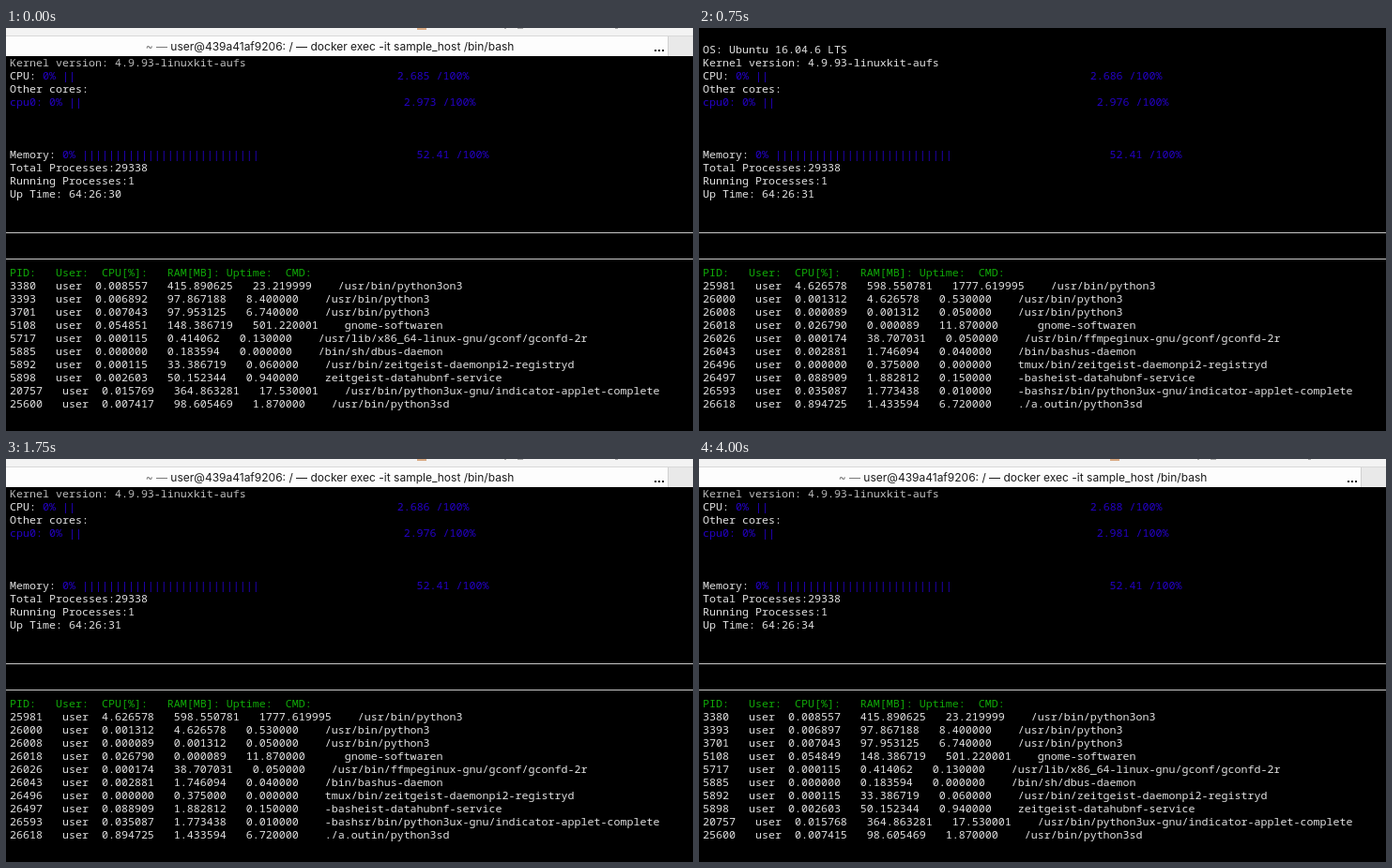
Animation, 732 px wide and 430 px high, one loop 4500 ms. Source, as an HTML page:

```html
<!DOCTYPE html>
<html lang="en">
<head>
<meta charset="utf-8">
<title>Process monitor</title>
<style>
html, body { margin: 0; width: 100%; height: 100%; overflow: hidden; background: #000; }
#stage { position: relative; width: 732px; height: 430px; overflow: hidden; background: #000; }
pre {
  position: absolute; left: 4px; top: 16px; margin: 0; color: #e2e2e2;
  font: 500 11.667px/14px "Noto Sans Mono", monospace; font-variant-ligatures: none;
}
.b { color: #2300c4; }
.g { color: #10aa08; }
hr { position: absolute; left: 0; width: 732px; height: 1px; margin: 0; border: 0; background: #c8c8c8; }
svg { position: absolute; left: 0; top: 0; }
</style>
</head>
<body>
<div id="stage">
  <pre id="screen"></pre>
  <hr style="top:218px">
  <hr style="top:246px">
  <svg width="732" height="48">
    <defs>
      <linearGradient id="shade" x2="0" y2="1">
        <stop stop-opacity=".4"/>
        <stop offset="1" stop-opacity="0"/>
      </linearGradient>
    </defs>
    <g id="bar">
      <rect y="30" width="732" height="13" fill="url(#shade)"/>
      <rect width="732" height="30" fill="#f3f3f3"/>
      <path d="M438 0h10v2h-10z" fill="#d9ab85"/>
      <path d="M531 0h2v1h-2zM545 0h6v1h-6zM649 0h3v1h-3z" fill="#aaa"/>
      <path d="M0 8.5H732" stroke="#d8d8d8"/>
      <rect id="tab" y="9" width="705" height="21"/>
      <rect x="705" y="9" width="27" height="21" fill="#e9e9e9"/>
      <path d="M705.5 9V30" stroke="#d0d0d0"/>
      <text x="345" y="23.5" text-anchor="middle" font-family="Inter, sans-serif" font-size="12" fill="#1a1a1a"><tspan fill="#777">~ — </tspan>user@439a41af9206: / — docker exec -it sample_host /bin/bash</text>
      <path id="dots" d="M691 23h2v2h-2zM695 23h2v2h-2zM699 23h2v2h-2z" fill="#111"/>
      <path id="close" d="M713.5 14.5l7 7m0-7l-7 7" stroke="#777" stroke-width="1.1"/>
    </g>
  </svg>
</div>
<script>
const LOOP = 4500;
const $ = id => document.getElementById(id);

// Each row: pid, cpu, ram, uptime, command (with characters left over from earlier screens)
const first = `3380 0.008557 415.890625 23.219999 /usr/bin/python3on3
3393 0.006892 97.867188 8.400000 /usr/bin/python3
3701 0.007043 97.953125 6.740000 /usr/bin/python3
5108 0.054851 148.386719 501.220001 gnome-softwaren
5717 0.000115 0.414062 0.130000 /usr/lib/x86_64-linux-gnu/gconf/gconfd-2r
5885 0.000000 0.183594 0.000000 /bin/sh/dbus-daemon
5892 0.000115 33.386719 0.060000 /usr/bin/zeitgeist-daemonpi2-registryd
5898 0.002603 50.152344 0.940000 zeitgeist-datahubnf-service
20757 0.015769 364.863281 17.530001 /usr/bin/python3ux-gnu/indicator-applet-complete
25600 0.007417 98.605469 1.870000 /usr/bin/python3sd`;

const second = `25981 4.626578 598.550781 1777.619995 /usr/bin/python3
26000 0.001312 4.626578 0.530000 /usr/bin/python3
26008 0.000089 0.001312 0.050000 /usr/bin/python3
26018 0.026790 0.000089 11.870000   gnome-softwaren
26026 0.000174 38.707031 0.050000 /usr/bin/ffmpeginux-gnu/gconf/gconfd-2r
26043 0.002881 1.746094 0.040000 /bin/bashus-daemon
26496 0.000000 0.375000 0.020000 tmux/bin/zeitgeist-daemonpi2-registryd
26497 0.088909 1.882812 0.150000 -basheist-datahubnf-service
26593 0.035087 1.773438 0.010000 -bashsr/bin/python3ux-gnu/indicator-applet-complete
26618 0.894725 1.433594 6.720000 ./a.outin/python3sd`.replace("0.020000", "0.000000");

const third = `1 0.000013 0.199219 0.030000 /bin/bash/usr/bin/python3
39 0.009543 13.125000 20.240000 tmuxr/bin/python3
40 0.101008 1.863281 0.140000 -bashsr/bin/python3
65 2.408436 3.671875 1.420000 -bash gnome-softwaren
89 0.000101 1.773438 0.030000 -bashusr/bin/ffmpeginux-gnu/gconf/gconfd-2r
113 0.001283 2.726562 0.260000 -bashn/bashus-daemon
645 10.743024 153.730469 3318.820068 /usr/bin/python3aemonpi2-registryd
735 0.008034 327.531250 17.830000 /usr/bin/python3nf-service
918 0.067322 26.968750 208.880005 Xvnc4r/bin/python3ux-gnu/indicator-applet-complete
927 0.167101 105.132812 16.480000 gnome-panelthon3sd`;

const fourth = `929 0.001785 30.910156 6.210000 metacitysr/bin/python3
930 0.019672 98.179688 400.980011 nautiluspython3
950 0.000000 0.371094 0.000000 dbus-launchpython3
954 0.000394 0.597656 0.740000 /usr/bin/dbus-daemon
959 0.000005 32.972656 0.030000 /usr/lib/at-spi2-core/at-spi-bus-launcher
964 0.000016 0.398438 0.000000 /usr/bin/dbus-daemon
968 0.000016 16.792969 0.100000 /usr/lib/at-spi2-core/at-spi2-registryd
991 0.000048 16.800781 0.040000 /usr/lib/dconf/dconf-service
1000 0.000027 27.535156 0.130000 /usr/lib/x86_64-linux-gnu/indicator-applet-complete
1009 0.000005 24.894531 0.010000 /usr/lib/gvfs/gvfsd`;

const fifth = first.replace("0.006892", "0.006897").replace("0.054851", "0.054849")
  .replace("0.015769", "0.015768").replace("0.007417", "0.007415");

const screens = [
  { at: 0, cpu: "2.685", core: "2.973", rows: first },
  { at: 750, cpu: "2.686", core: "2.976", rows: second },
  { at: 2000, cpu: "2.690", core: "2.978", rows: third },
  { at: 3000, cpu: "2.690", core: "2.978", rows: fourth },
  { at: 4000, cpu: "2.688", core: "2.981", rows: fifth }
];

// Title bar: vertical shift (null = hidden), close button, opacity of the dots
const bars = [
  { at: 0, y: 0, close: 0, dots: 1 },
  { at: 250, y: 0, close: 1, dots: 1 },
  { at: 500, y: null },
  { at: 1000, y: -12, close: 1, dots: 1 },
  { at: 1250, y: 0, close: 0, dots: .5 },
  { at: 1500, y: 0, close: 0, dots: .8 },
  { at: 1750, y: 0, close: 0, dots: 1 }
];

const span = (cls, text) => `<span class="${cls}">${text}</span>`;
const gauge = (bars, width, value) =>
  span("b", ("0% " + "|".repeat(bars)).padEnd(width) + value + " /100%");
const format = rows =>
  rows.replace(/^(\S+) (\S+) (\S+) (\S+) (.*)$/gm, "$1   user  $2   $3   $4    $5");

function drawScreen(s) {
  $("screen").innerHTML = [
    "OS: Ubuntu 16.04.6 LTS",
    "Kernel version: 4.9.93-linuxkit-aufs",
    "CPU: " + gauge(2, 54, s.cpu),
    "Other cores:",
    span("b", "cpu0: ") + gauge(2, 54, s.core),
    "", "", "",
    "Memory: " + gauge(27, 54, "52.41"),
    "Total Processes:29338",
    "Running Processes:1",
    "Up Time: 64:26:" + (30 + screens.indexOf(s)),
    "", "", "", "", "",
    span("g", "PID:   User:  CPU[%]:   RAM[MB]: Uptime:  CMD:"),
    format(s.rows)
  ].join("\n");
}

function drawBar(b) {
  $("bar").style.display = b.y === null ? "none" : "";
  if (b.y === null) return;
  $("bar").setAttribute("transform", `translate(0 ${b.y})`);
  $("tab").setAttribute("fill", b.y ? "#f4f4f4" : "#fdfdfd");
  $("close").setAttribute("opacity", b.close);
  $("dots").setAttribute("opacity", b.dots);
}

const current = (list, t) => list.findLast(item => item.at <= t);
const start = performance.now();
let screen, bar;

function tick() {
  const t = (performance.now() - start) % LOOP;
  const nextScreen = current(screens, t), nextBar = current(bars, t);
  if (nextScreen !== screen) drawScreen(screen = nextScreen);
  if (nextBar !== bar) drawBar(bar = nextBar);
  requestAnimationFrame(tick);
}
tick();
</script>
</body>
</html>
```
